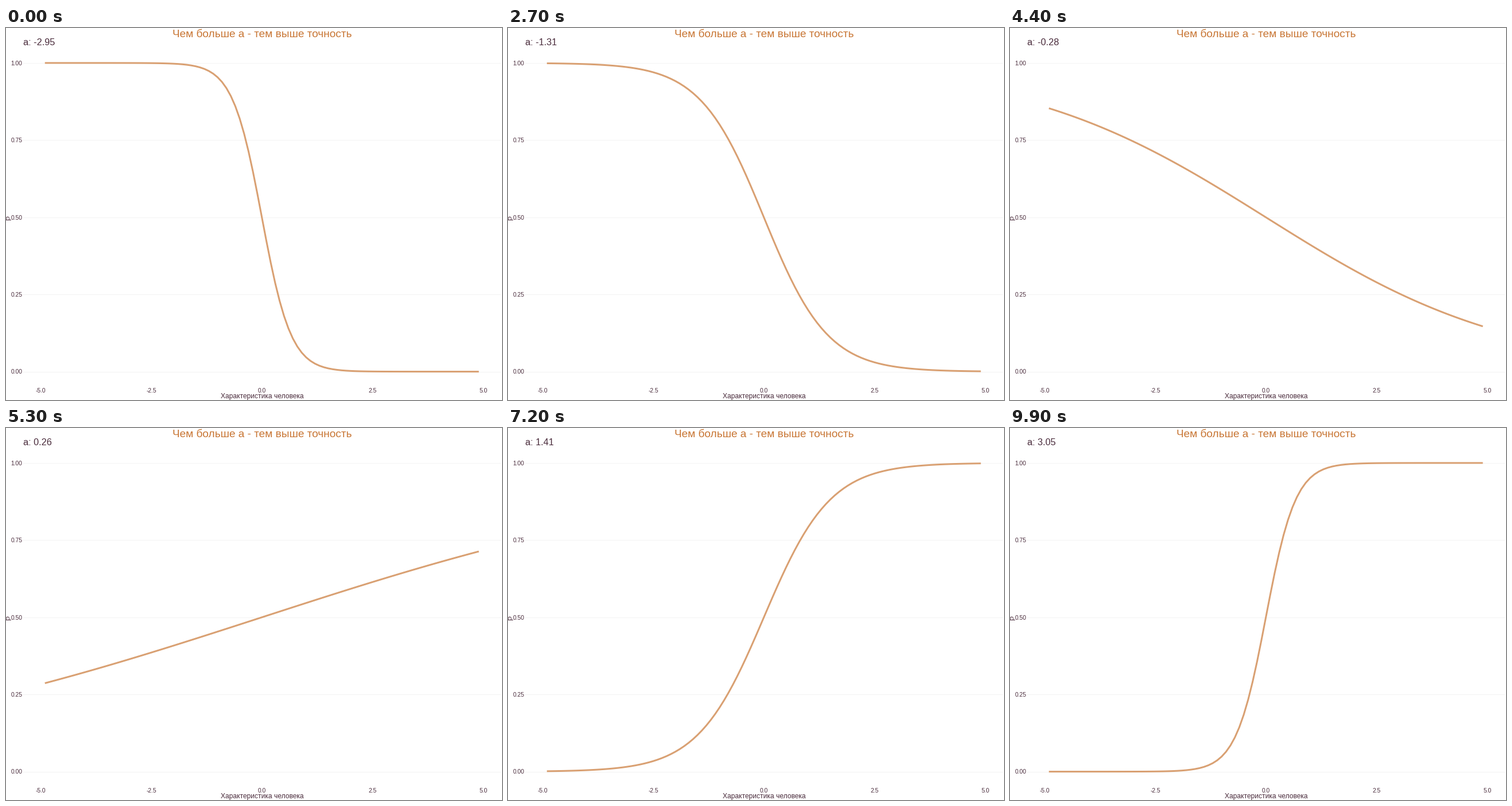
Recreate the animation shown at these times as a matplotlib script. Size 864 px wide and 648 px high, loop 10000 ms.

```python
import numpy as np
import matplotlib.pyplot as plt
from matplotlib.animation import FuncAnimation

W, H, DPI = 864, 648, 72
FRAMES, INTERVAL = 100, 100
DARK, ORANGE, CURVE, GRID = "#4a2c3c", "#c87533", "#d9a072", "#f3f3f3"

plt.rcParams["font.family"] = "Liberation Sans"

fig = plt.figure(figsize=(W / DPI, H / DPI), dpi=DPI, facecolor="white")
ax = fig.add_axes([0, 0, 1, 1])
ax.set_xlim(0, W)
ax.set_ylim(H, 0)
ax.axis("off")


def to_x(theta):
    return 445.7 + 77.13 * theta


def to_y(p):
    return 598.6 - 537.7 * p


def label(x, y, text, size, color=DARK, ha="center", **kw):
    kw.setdefault("va", "baseline")
    return ax.text(x, y, text, fontsize=size, color=color, ha=ha, **kw)


for p in np.linspace(0, 1, 5):
    ax.plot([30, 861], [to_y(p)] * 2, color=GRID, lw=1, zorder=1)
    label(28.3, to_y(p) + 3.8, f"{p:.2f}", 10.3, ha="right")

for theta in np.linspace(-5, 5, 5):
    label(to_x(theta), 635.4, f"{theta:.1f}", 10.3)

label(445.7, 15.5, "Чем больше a - тем выше точность", 19, ORANGE)
label(446, 644.5, "Характеристика человека", 12)
label(5.5, 330, "P", 12, va="center", rotation=90)
readout = label(29.5, 30.3, "", 16.3, ha="left")

theta = np.linspace(-4.9, 4.9, 99)
curve, = ax.plot([], [], color=CURVE, lw=3, solid_capstyle="butt",
                 solid_joinstyle="round", zorder=2)


def update(i):
    a = -2.95 + 6 * i / (FRAMES - 1)
    slope = a - 0.076  # the curve lags slightly behind the readout
    curve.set_data(to_x(theta), to_y(1 / (1 + np.exp(-slope * theta))))
    readout.set_text(f"a: {a:.2f}")
    return curve, readout


anim = FuncAnimation(fig, update, frames=FRAMES, interval=INTERVAL,
                     repeat=True, repeat_delay=0)
plt.show()
```
